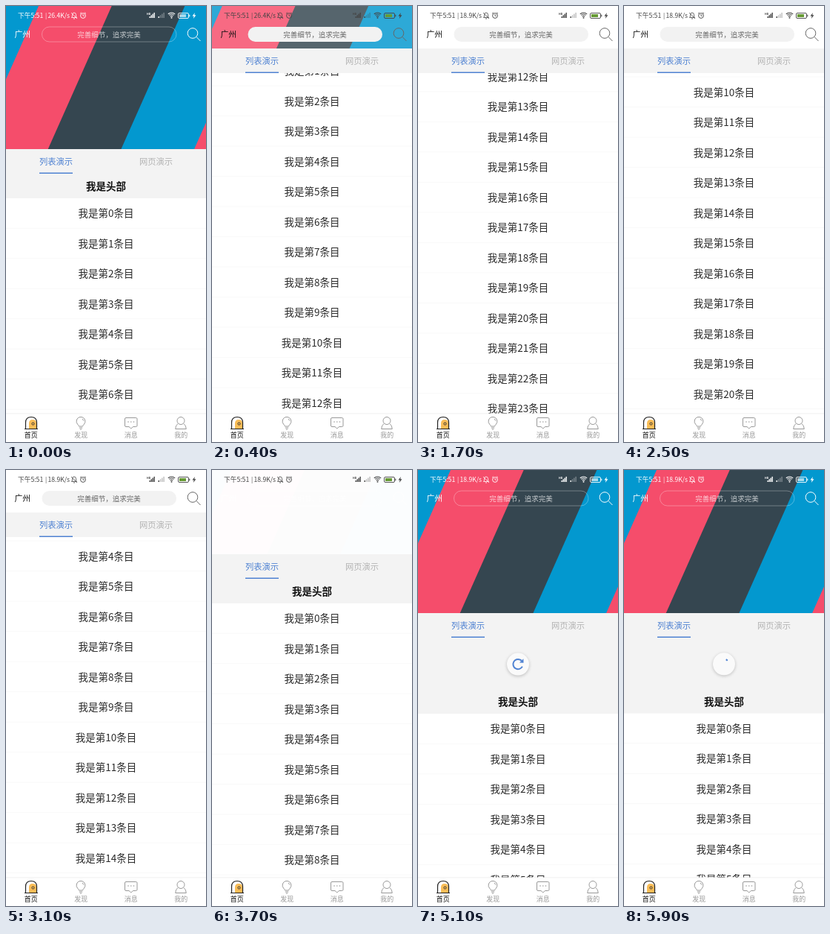
An HTML page with a canvas that plays this animation: 270 by 585 pixels, repeating every 6 s.

```html
<!DOCTYPE html>
<html lang="zh-CN">
<head>
<meta charset="utf-8">
<style>
html, body { margin: 0; width: 100%; height: 100%; overflow: hidden; background: #fff; }
canvas { display: block; width: 270px; height: 585px; }
</style>
</head>
<body>
<canvas id="stage"></canvas>
<script>
const W = 270, H = 585, LOOP = 6000;
const ROW = 40.5, BANNER = 192, BAR = 57, TABS = 33, NAV = 547;
const BLUE = '#4f82d2', PANEL = '#f3f3f3', TAU = Math.PI * 2;
const FONT = '"Noto Sans CJK SC", "Noto Sans CJK", "Noto Sans", sans-serif';
const canvas = document.getElementById('stage');
const ctx = canvas.getContext('2d');
const dpr = window.devicePixelRatio || 1;
canvas.width = W * dpr;
canvas.height = H * dpr;

const SCROLL = [[0, 0], [100, 8], [200, 45], [300, 120], [450, 290], [600, 465], [700, 560], [800, 597.5],
  [1500, 597.5], [1900, 740], [2100, 735], [2500, 568], [3100, 325], [3700, 79.5], [3900, 0], [6000, 0]];
const PULL = [[0, 0], [3920, 0], [4200, 35], [4500, 62], [4800, 80], [5100, 69.2], [5300, 68.6], [6000, 68.6]];
const FADE_IN = 250, FADE_OUT = 3696, FADE = 600;
const LOADED = 1300, SPEED_CHANGE = 1500, REFRESH = 5190, FOLD = 666;

const clamp = v => Math.max(0, Math.min(1, v));

// Smooth curve through the points that never overshoots them.
function curve(points, t) {
  const rate = i => (points[i + 1][1] - points[i][1]) / (points[i + 1][0] - points[i][0]);
  const slope = i => {
    if (i === 0 || i === points.length - 1) return 0;
    const a = rate(i - 1), b = rate(i);
    return a * b <= 0 ? 0 : 2 * a * b / (a + b);
  };
  let i = 0;
  while (i < points.length - 2 && t >= points[i + 1][0]) i++;
  const [t0, a] = points[i], [t1, b] = points[i + 1];
  const d = t1 - t0, u = (t - t0) / d, v = 1 - u;
  return a * (1 + 2 * u) * v * v + b * u * u * (3 - 2 * u)
    + d * u * v * (slope(i) * v - slope(i + 1) * u);
}

function rect(x, y, w, h, color) {
  ctx.fillStyle = color;
  ctx.fillRect(x, y, w, h);
}

// y is the middle of the line
function text(str, x, y, size, color, align = 'center', weight = 400) {
  ctx.font = `${weight} ${size}px ${FONT}`;
  ctx.textAlign = align;
  ctx.fillStyle = color;
  ctx.fillText(str, x, y + size * 0.38);
}

function path(d, color, width = 1, fill) {
  const p = new Path2D(d);
  if (fill) { ctx.fillStyle = fill; ctx.fill(p); }
  if (color) { ctx.strokeStyle = color; ctx.lineWidth = width; ctx.stroke(p); }
}

function arc(x, y, r, color, width = 1, from = 0, to = TAU) {
  ctx.beginPath();
  ctx.arc(x, y, r, from, to);
  ctx.strokeStyle = color;
  ctx.lineWidth = width;
  ctx.stroke();
}

function disc(x, y, r, color) {
  ctx.beginPath();
  ctx.arc(x, y, r, 0, TAU);
  ctx.fillStyle = color;
  ctx.fill();
}

function drawBanner(height, offset) {
  const colors = ['#0398cf', '#f54d6b', '#354650', '#0398cf', '#f54d6b'];
  const lean = 86, step = 98.7;
  ctx.save();
  ctx.beginPath();
  ctx.rect(0, 0, W, height);
  ctx.clip();
  ctx.translate(0, -offset / 2);
  rect(0, 0, W, BANNER, colors[0]);
  for (let i = 1; i < colors.length; i++) {
    const x = 44 + (i - 1) * step;
    path(`M${x} 0H500V${BANNER}H${x - lean}Z`, null, 0, colors[i]);
  }
  ctx.restore();
}

function drawStatus(t, dark) {
  const c = dark ? '#444' : '#fff';
  text('下午5:51', 16, 13, 8.7, c, 'left', 500);
  text('|', 53, 12.5, 8, c, 'left', 500);
  text((t < SPEED_CHANGE ? '26.4' : '18.9') + 'K/s', 56.5, 13, 8.6, c, 'left', 500);
  path('M88.5 15.5H95.5L94.5 14V11.5Q94.3 9 92 9Q89.7 9 89.5 11.5V14ZM91 17H93M88 9L96 17', c, 0.8);
  arc(104, 13, 3.4, c, 0.9);
  path('M104 11V13.2H105.6M100 10.3L102 8.6M108 10.3L106 8.6', c, 0.8);
  text('HD', 190, 10.5, 3.6, c, 'left', 700);
  for (let i = 0; i < 4; i++) {
    const h = 2 + i * 1.7;
    rect(193.5 + i * 2, 16 - h, 1.4, h, c);
    ctx.globalAlpha = i ? 0.35 : 1;
    rect(205.5 + i * 2.3, 16 - h, 1.4, h, c);
    ctx.globalAlpha = 1;
  }
  for (const r of [2.6, 4.8, 7]) arc(223.5, 16, r, c, 1.1, -2.3, -0.84);
  disc(223.5, 15.7, 1, c);
  path('M234 9.5H245Q246.5 9.5 246.5 11V15Q246.5 16.5 245 16.5H234Q232.5 16.5 232.5 15V11Q232.5 9.5 234 9.5Z', c, 0.9);
  rect(234, 11, 9, 4, dark ? '#679a35' : 'rgba(255,255,255,.65)');
  rect(247.3, 11.7, 1, 2.6, c);
  path('M255 9L251.5 13.6H253.7L252.8 17L256.5 12.3H254.2Z', null, 0, c);
}

function drawToolbar(dark) {
  const c = dark ? '#111' : '#fff';
  text('广州', 11.5, 38, 10.8, c, 'left', 500);
  ctx.beginPath();
  ctx.roundRect(48.5, 28, 181.5, 20, 10);
  if (dark) {
    ctx.fillStyle = '#f2f2f2';
    ctx.fill();
  } else {
    ctx.strokeStyle = 'rgba(255,255,255,.38)';
    ctx.lineWidth = 0.8;
    ctx.stroke();
  }
  text('完善细节，追求完美', 139, 38, 9.5, dark ? '#666' : 'rgba(255,255,255,.72)');
  const lens = dark ? '#666' : '#fff';
  arc(252, 36.5, 6.8, lens, 1);
  path('M257 41.5L262.5 47', lens, 1);
}

function drawTabs(top) {
  rect(0, top, W, TABS, PANEL);
  text('列表演示', 67.5, top + 17, 11.3, BLUE);
  text('网页演示', 202.5, top + 17, 11.3, '#b4b4b4');
  rect(45, top + 31.5, 45, 1.5, BLUE);
}

function drawList(t, scroll, pull, top) {
  ctx.save();
  ctx.beginPath();
  ctx.rect(0, top, W, NAV - top);
  ctx.clip();
  rect(0, top, W, NAV - top, '#fff');
  const start = 258 - scroll + pull;
  if (start > top) {
    rect(0, top, W, start - top, PANEL);
    text('我是头部', W / 2, start - 16, 13.5, '#111', 'center', 700);
  }
  const count = t < LOADED ? 20 : 40;
  for (let i = 0; i < count; i++) {
    const y = start + i * ROW;
    if (y > NAV || y + ROW < top) continue;
    text(`我是第${i}条目`, W / 2, y + 20, 13.5, '#2a2a2a');
    rect(0, y + ROW - 0.7, W, 0.7, '#f6f6f6');
  }
  const end = start + count * ROW;
  if (end < NAV) {
    rect(0, end, W, NAV - end, PANEL);
    text('我是尾部', W / 2, end + 17, 13.5, '#111', 'center', 700);
    ['#6d9a8b', '#e5a02c', '#4170c4'].forEach((color, i) => {
      const phase = (t - 800 - i * 40 + 20) / 750 * TAU;
      disc(122 + i * 13, end + 53, 1.9 + 1.1 * (1 - Math.cos(phase)), color);
    });
  }
  ctx.restore();
}

function drawSpinner(t, pull) {
  if (pull < 1) return;
  const x = W / 2, y = BANNER + 34 + pull / 2, r = 6.6;
  ctx.save();
  ctx.beginPath();
  ctx.rect(0, BANNER + TABS, W, H);
  ctx.clip();
  ctx.shadowColor = 'rgba(0,0,0,.22)';
  ctx.shadowBlur = 4 * dpr;
  ctx.shadowOffsetY = 1.2 * dpr;
  disc(x, y, 15, '#fafafa');
  ctx.shadowColor = 'transparent';

  const spinning = t >= REFRESH;
  const ready = spinning ? 1 : clamp((pull / 69 - 0.4) * 5 / 3);
  const fold = clamp((t - REFRESH) / FOLD);
  const tail = 0.74 * fold;
  const base = (0.4 * ready - 0.25) / 2;
  const turn = base + (1 - base) * fold + Math.max(0, t - REFRESH - FOLD) * 0.0017;
  const from = (turn + tail) * TAU, to = (turn + 0.8 * ready) * TAU;
  ctx.globalAlpha = spinning ? 1 : 0.4 + 0.6 * ready;
  if (ready > 0) arc(x, y, r, BLUE, 2, from, to);
  if (!spinning && ready > 0.3) {
    ctx.translate(x, y);
    ctx.rotate(to);
    ctx.translate(r, 0);
    ctx.scale(ready, ready);
    path('M-3.8 0H3.8L0 4Z', null, 0, BLUE);
  }
  ctx.restore();
}

function drawNav() {
  const gray = '#999';
  rect(0, NAV, W, H - NAV, '#fff');
  rect(0, NAV - 0.5, W, 0.8, '#ececec');
  path('M31 567V560Q31 555 36 555Q41 555 41 560V567Z', null, 0, '#f9bd57');
  path('M26.5 567.5V559Q26.5 551.5 34 551.5Q41.5 551.5 41.5 559V567.5M25 567.5H43', '#222', 1.2);
  arc(36.5, 560.5, 1.6, '#333', 1);
  path('M98.5 564Q98 562.5 96.5 561Q94.5 558.5 95.3 556Q96.5 551.5 101 551.5Q105.5 551.5 106.7 556Q107.5 558.5 105.5 561Q104 562.5 103.5 564ZM98.8 566H103.2M99.8 568H102.2M103 554Q104.3 554.7 104.5 556.5', gray);
  path('M162 552.5H175.5Q177 552.5 177 554V563Q177 564.5 175.5 564.5H171.5L168.8 567L166 564.5H162Q160.5 564.5 160.5 563V554Q160.5 552.5 162 552.5Z', gray);
  for (const x of [165, 168.8, 172.5]) disc(x, 558, 0.8, gray);
  arc(236, 556.5, 5, gray);
  path('M232 560.5Q229 562.5 228.7 567.5H243.3Q243 562.5 240 560.5', gray);
  ['首页', '发现', '消息', '我的'].forEach((label, i) =>
    text(label, 33.75 + i * 67.5, 575.5, 9, i ? gray : '#111', 'center', i ? 400 : 500));
}

function draw(t) {
  const scroll = curve(SCROLL, t), pull = curve(PULL, t);
  const shift = Math.floor(Math.min(scroll + 0.5, BANNER - BAR)), height = BANNER - shift;
  const veil = t < FADE_OUT
    ? clamp((t - FADE_IN) / FADE) ** 1.3
    : (1 - clamp((t - FADE_OUT) / FADE)) ** 2;
  ctx.setTransform(dpr, 0, 0, dpr, 0, 0);
  rect(0, 0, W, H, '#fff');
  drawBanner(height, shift);
  rect(0, 0, W, height, `rgba(255,255,255,${veil})`);
  drawToolbar(t >= FADE_IN && t < FADE_OUT);
  drawStatus(t, t >= FADE_IN && t < FADE_OUT + 60);
  drawList(t, scroll, pull, height + TABS);
  drawTabs(height);
  drawSpinner(t, pull);
  drawNav();
}

const began = performance.now();
function tick() {
  draw((performance.now() - began) % LOOP);
  requestAnimationFrame(tick);
}
tick();
</script>
</body>
</html>
```
